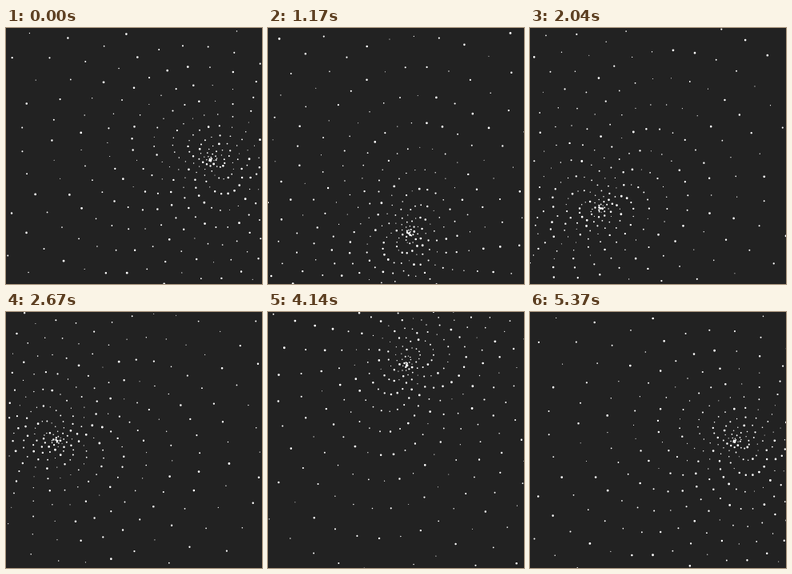
Write an HTML page with a canvas that moves like this. It is 320x320 px and loops after 5400 ms.

```html
<!DOCTYPE html>
<html lang="en">
<head>
<meta charset="utf-8">
<title>Orbiting dots</title>
<style>
  html, body { margin: 0; width: 100%; height: 100%; overflow: hidden; background: #222; }
  canvas { display: block; width: 320px; height: 320px; }
</style>
</head>
<body>
<canvas id="stage"></canvas>
<script>
const SIZE = 320, LOOP = 5400, STEP = 30;
const COUNT = 505;
const GAP = 0.64;        // radial distance between successive dots
const ORBIT = 96;        // radius of the circle every dot travels on
const LEAD = 0.00432;    // phase lead per dot, in radians
const CX = 160.5, CY = 160.8;

const canvas = document.getElementById('stage');
const ctx = canvas.getContext('2d');
const ratio = window.devicePixelRatio || 1;
canvas.width = canvas.height = SIZE * ratio;
ctx.scale(ratio, ratio);

const noise = i => {
  const v = Math.sin(i * 12.9898 + 4.1) * 43758.5453;
  return v - Math.floor(v);
};

// Each dot sits one radian further along a spiral than the last.
const dots = Array.from({ length: COUNT }, (_, i) => ({
  x: CX + GAP * i * Math.cos(i),
  y: CY + GAP * i * Math.sin(i),
  lead: LEAD * i,
  radius: 0.5 + 0.95 * noise(i)
}));

function draw(ms) {
  const frame = Math.floor((ms % LOOP) / STEP);
  const angle = (frame + 1) * STEP / LOOP * Math.PI * 2;
  ctx.fillStyle = '#222';
  ctx.fillRect(0, 0, SIZE, SIZE);
  ctx.fillStyle = '#fff';
  ctx.beginPath();
  for (const d of dots) {
    const x = d.x + ORBIT * Math.cos(angle + d.lead);
    const y = d.y + ORBIT * Math.sin(angle + d.lead);
    ctx.moveTo(x + d.radius, y);
    ctx.arc(x, y, d.radius, 0, Math.PI * 2);
  }
  ctx.fill();
}

const start = performance.now();
function tick() {
  draw(performance.now() - start);
  requestAnimationFrame(tick);
}
tick();
</script>
</body>
</html>
```
